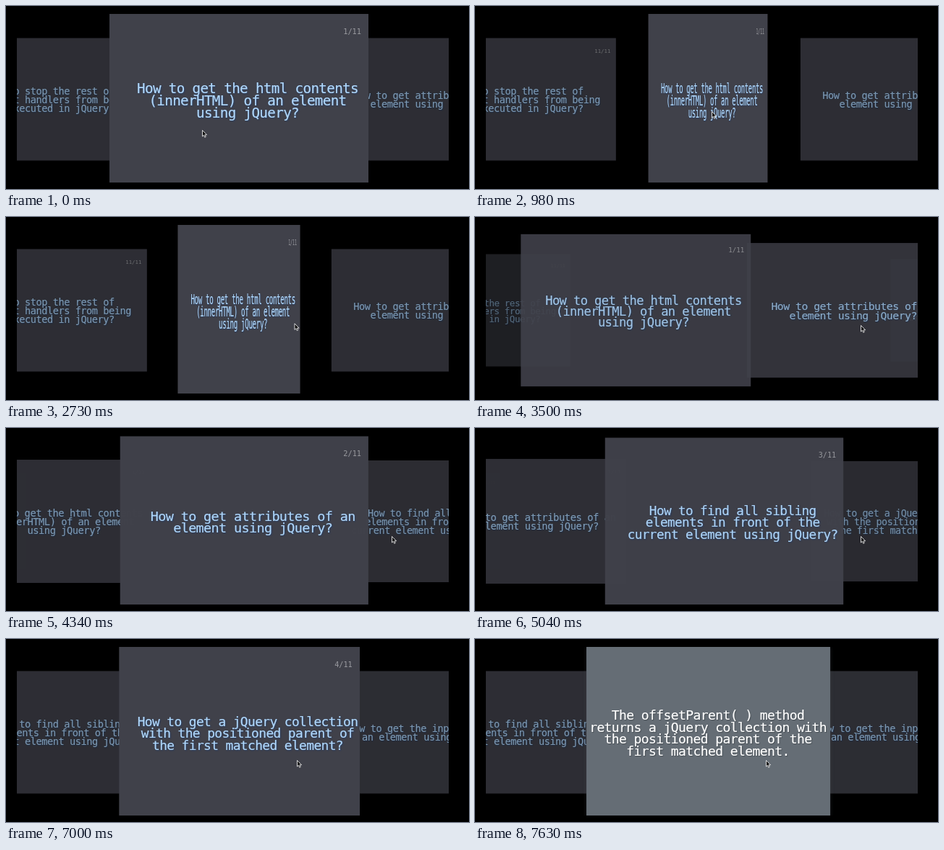
These frames come from a looping animation (640 by 254 pixels, 8000 ms). An HTML page:

```html
<!DOCTYPE html>
<html lang="en">
<head>
<meta charset="utf-8">
<title>Flip card carousel</title>
<style>
  html, body { margin: 0; width: 100%; height: 100%; overflow: hidden; background: #000; }
  #stage { position: absolute; left: 0; top: 0; width: 640px; height: 254px; overflow: hidden; background: #000; }
  #deck { position: absolute; left: 15px; top: 11px; width: 597px; height: 234px; overflow: hidden; isolation: isolate; }
  .slide { position: absolute; left: 0; top: 0; width: 0; height: 0; }
  .face {
    position: absolute; height: 238px; top: -119px;
    display: flex; align-items: center; justify-content: center;
    font-family: "DejaVu Sans Mono", monospace; line-height: 17px;
    white-space: pre; text-align: center;
  }
  .face p { margin: 0; position: relative; top: 1px; letter-spacing: -.034em; -webkit-text-stroke: .2px; }
  .front { background: #40414a; color: #b0d8fc; text-shadow: 1px 1px 2px rgba(30, 60, 110, .7); }
  .front p { left: 12px; }
  .front small {
    position: absolute; right: 10px; top: 15.5px;
    font-size: 10.3px; color: #9a9ba0; text-shadow: none;
  }
  .back {
    width: 337px; left: -168.5px; font-size: 18.05px;
    background: #656d75; color: #fff;
    box-shadow: 0 0 5px rgba(70, 75, 82, .6);
    text-shadow: 1px 1px 1px rgba(40, 45, 50, .5);
  }
  #ripple {
    position: absolute; left: 313px; top: 134px; width: 25px; height: 25px;
    border: 1px solid rgba(220, 225, 230, .55); border-radius: 50%;
    background: rgba(101, 109, 117, .35);
  }
  #cursor { position: absolute; left: 0; top: 0; overflow: visible; }
</style>
</head>
<body>
<div id="stage">
  <div id="deck"></div>
  <div id="ripple"></div>
  <svg id="cursor" width="8" height="12">
    <path d="M.5 .5V9L2.4 7.3 3.8 10.3 5.2 9.6 3.9 6.8H6.6Z" fill="#111" stroke="#fff" stroke-width=".8"/>
  </svg>
</div>
<script>
const LOOP = 8000;
const CENTER = { x: 322 - 15, y: 129.5 - 11 };
const SPACING = 356, DEPTH = 0.4, SIDE_WIDTH = 355;
const SLIDE_CLICKS = [3410, 4380, 5154], GLIDE = 240;
const FLIP_TIME = 700;

const cards = [
  { no: 11, width: 348, front: "to stop the rest of\nevent handlers from being\nexecuted in jQuery?" },
  { no: 1, width: 358, front: "How to get the html contents\n(innerHTML) of an element\nusing jQuery?",
    back: "The html() method gets the html\ncontents (innerHTML) of the\nfirst matched element.",
    flips: [700, 2310] },
  { no: 2, width: 346, front: "How to get attributes of an\nelement using jQuery?" },
  { no: 3, width: 337, front: "How to find all sibling\nelements in front of the\ncurrent element using jQuery?" },
  { no: 4, width: 337, front: "How to get a jQuery collection\nwith the positioned parent of\nthe first matched element?",
    back: "The offsetParent( ) method\nreturns a jQuery collection with\nthe positioned parent of the\nfirst matched element.",
    flips: [6900] },
  { no: 5, width: 337, front: "How to get the input value of\nan element using jQuery?" }
];

// time, x, y
const cursorPath = [
  [0, 271, 172], [210, 271, 172], [690, 327, 146], [2310, 327, 146],
  [3360, 533, 150], [5250, 533, 150], [5740, 433, 160], [6500, 402, 168], [LOOP, 402, 168]
];

const $ = id => document.getElementById(id);
const clamp = v => Math.min(1, Math.max(0, v));
const mix = (a, b, k) => a + (b - a) * k;
const smooth = k => (1 - Math.cos(Math.PI * clamp(k))) / 2;

function add(parent, tag, className, text = "") {
  const el = document.createElement(tag);
  el.className = className;
  el.textContent = text;
  return parent.appendChild(el);
}

for (const card of cards) {
  card.el = add($("deck"), "div", "slide");
  card.frontEl = add(card.el, "div", "face front");
  add(card.frontEl, "p", "", card.front);
  add(card.frontEl, "small", "", card.no + "/11");
  if (card.back) {
    card.backEl = add(card.el, "div", "face back");
    add(card.backEl, "p", "", card.back);
  }
}

function deckPosition(t) {
  return SLIDE_CLICKS.reduce((p, c) => t > c ? p + 1 - Math.exp((c - t) / GLIDE) : p, 1);
}

function flipAngle(flips = [], t) {
  return flips.reduce((a, start) => a + Math.PI * smooth((t - start) / FLIP_TIME), 0);
}

function placeCard(card, d, t) {
  const far = Math.abs(d);
  card.el.style.display = far < 2 ? "" : "none";
  if (far >= 2) return;

  const scale = 1 / (1 + DEPTH * far);
  const turn = Math.cos(flipAngle(card.flips, t));
  const x = CENTER.x + SPACING * d * scale;
  card.el.style.transform =
    `translate(${x}px, ${CENTER.y}px) scale(${scale * Math.abs(turn)}, ${scale})`;
  card.el.style.opacity = far < 1 ? 1 - 0.3 * far : 0.7 * (2 - far);
  card.el.style.zIndex = Math.round(100 - 40 * far);

  const width = mix(card.width, SIDE_WIDTH, Math.min(1, far * far));
  const front = card.frontEl.style;
  front.width = width + "px";
  front.left = -width / 2 + "px";
  front.fontSize = width / 18.6 + "px";
  front.visibility = turn >= 0 ? "visible" : "hidden";
  if (card.backEl) card.backEl.style.visibility = turn < 0 ? "visible" : "hidden";
}

function placeCursor(t) {
  const i = cursorPath.findIndex(key => key[0] > t);
  const [t0, x0, y0] = cursorPath[i - 1], [t1, x1, y1] = cursorPath[i];
  const k = smooth((t - t0) / (t1 - t0));
  $("cursor").style.transform = `translate(${mix(x0, x1, k)}px, ${mix(y0, y1, k)}px)`;
}

function draw(t) {
  const p = deckPosition(t);
  cards.forEach((card, i) => placeCard(card, i - p, t));
  placeCursor(t);
  $("ripple").style.visibility = t >= 2170 && t < 2310 ? "visible" : "hidden";
}

const began = performance.now();
function tick() {
  draw((performance.now() - began) % LOOP);
  requestAnimationFrame(tick);
}
tick();
</script>
</body>
</html>
```
